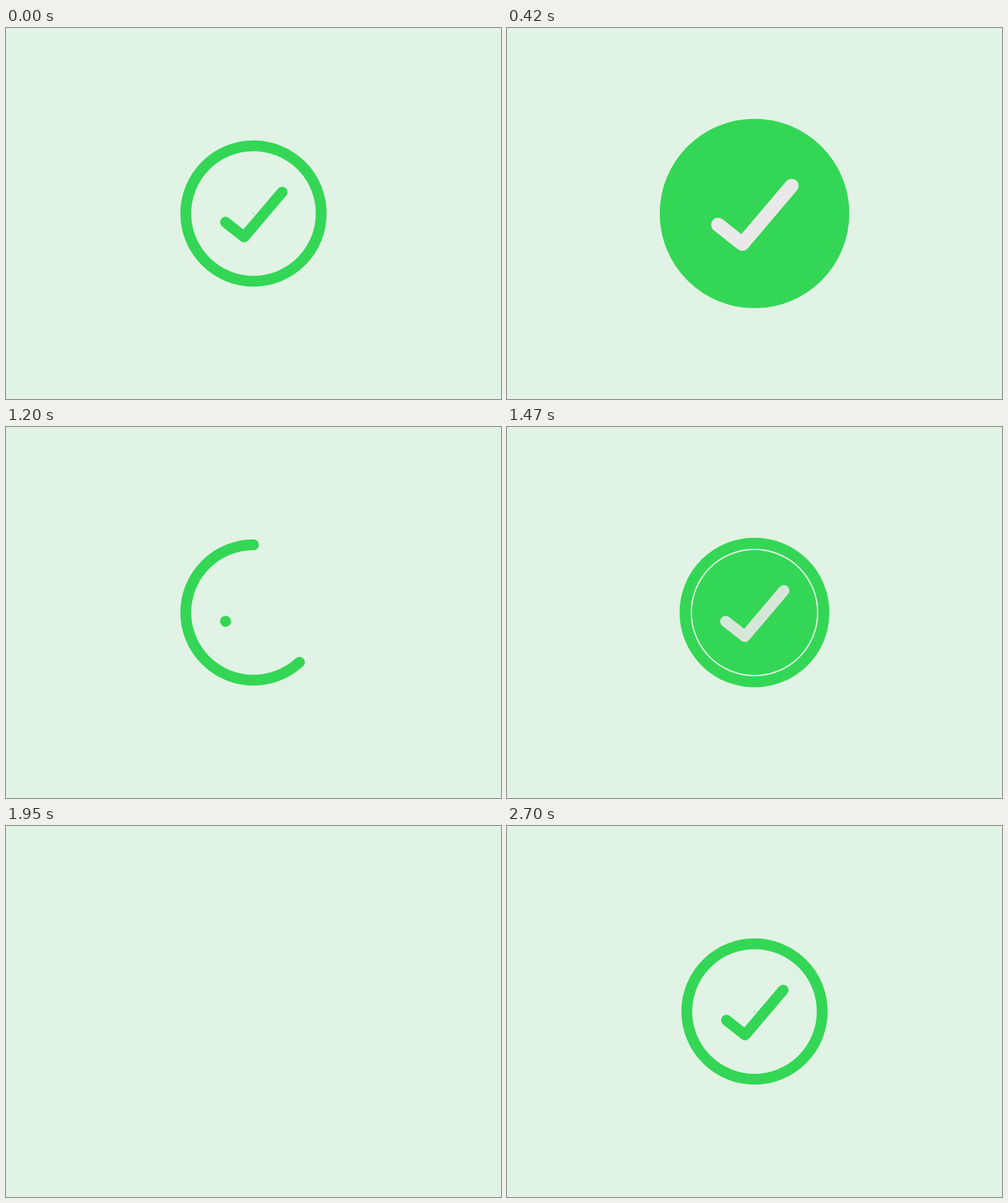
Write an HTML page that moves like this. It is 800x600 px and loops after 2730 ms.

```html
<!DOCTYPE html>
<html lang="en">
<head>
<meta charset="utf-8">
<title>Check</title>
<style>
html, body { margin: 0; width: 100%; height: 100%; overflow: hidden; background: #e1f3e4; }
svg { display: block; width: 100vw; height: 100vh; }
path { fill: none; stroke: #34d755; stroke-width: 17.5; stroke-linecap: round; stroke-linejoin: round; }
circle { fill: #34d755; }
</style>
</head>
<body>
<svg viewBox="0 0 800 600">
  <g id="badge">
    <path id="ring" pathLength="1000" d="M0 -109.5A109.5 109.5 0 0 0 0 109.5A109.5 109.5 0 0 0 0 -109.5"/>
    <circle id="disc" r="0"/>
    <path id="tick" pathLength="1000" d="M-45.3 14.1L-15.2 37.9L46.3 -34.6"/>
  </g>
</svg>
<script>
const LOOP = 2730, CYCLE = 1350, STEP = 30;
const [badge, ring, disc, tick] = ['badge', 'ring', 'disc', 'tick'].map(id => document.getElementById(id));
const GREEN = [52, 215, 85], GREY = [233, 233, 233];

const span = (t, from, to) => Math.min(1, Math.max(0, (t - from) / (to - from)));
const smooth = s => s * s * (3 - 2 * s);
const ease = (t, from, to) => smooth(span(t, from, to));

// Cubic Bezier (.6, 0, .6, 1), solved by bisection
function swing(x) {
  let lo = 0, hi = 1;
  for (let i = 0; i < 24; i++) {
    const s = (lo + hi) / 2, r = 1 - s;
    if (1.8 * r * r * s + 1.8 * r * s * s + s ** 3 < x) lo = s; else hi = s;
  }
  return smooth(lo);
}

function trim(path, p) {
  path.style.display = p > 0 ? '' : 'none';
  path.setAttribute('stroke-dasharray', p < 1 ? `${p * 1000} 3000` : 'none');
}

function draw(ms) {
  const t = (Math.floor((ms % LOOP) / STEP) * STEP + 450) % CYCLE;
  const size = (1 + 0.3 * ease(t, 545, 688)) * (1 - ease(t, 863, 1048));
  badge.style.display = size > 0 ? '' : 'none';
  badge.setAttribute('transform', `translate(400 300) scale(${size})`);
  const p = span(t, 20, 462);
  trim(ring, p > 0 && p < 1 ? swing(p) : p);
  trim(tick, ease(t, 295, 447));
  disc.setAttribute('r', 118.25 * ease(t, 441, 615));
  const tint = ease(t, 450, 600);
  tick.style.stroke = `rgb(${GREEN.map((c, i) => Math.round(c + (GREY[i] - c) * tint))})`;
}

const start = performance.now();
function frame() {
  draw(performance.now() - start);
  requestAnimationFrame(frame);
}
draw(0);
requestAnimationFrame(frame);
</script>
</body>
</html>
```
